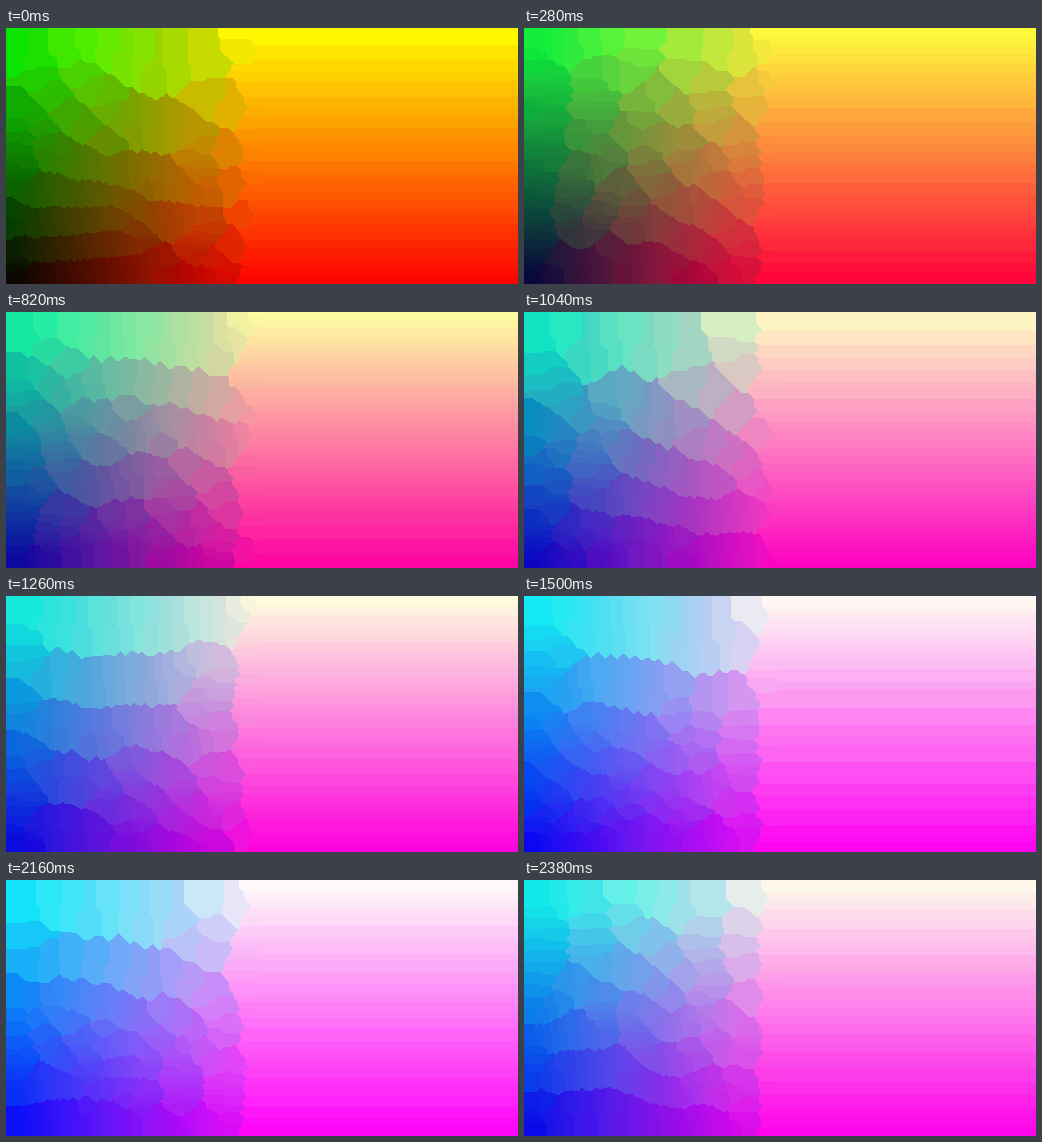
Animation, 512 px wide and 256 px high, one loop 2.4 s. Source, as an HTML page with a canvas:

```html
<!DOCTYPE html>
<html>
<head>
<meta charset="utf-8">
<style>
html, body { margin: 0; width: 100%; height: 100%; overflow: hidden; }
canvas { display: block; }
</style>
</head>
<body>
<canvas id="stage" width="512" height="256"></canvas>
<script>
const W = 512, H = 256, SIZE = 256, SAMPLING = 21;
const ctx = document.getElementById('stage').getContext('2d');
const redAt = x => Math.min(x, 255);
const greenAt = y => 255 - y;

// Self-organising 256-colour palette of the red/green/blue slice.
function learnPalette(blue) {
  const ramp = () => Float64Array.from({ length: SIZE }, (_, i) => i * 16);
  const R = ramp(), G = ramp(), B = ramp();
  const freq = new Int32Array(SIZE).fill(256), bias = new Int32Array(SIZE);
  const power = new Int32Array(32);
  const samples = W * H / SAMPLING, cycle = Math.floor(samples / 100);
  const alphaDecay = 30 + (SAMPLING - 1) / 3;
  let alpha = 1024, radius = 2048, reach;

  function updateReach() {
    reach = radius >> 6;
    if (reach <= 1) reach = 0;
    const sq = reach * reach;
    for (let i = 0; i < reach; i++) power[i] = alpha * ((sq - i * i) * 256 / sq);
  }

  function contest(r, g, b) {
    let best = 0, bestDist = Infinity, winner = 0, winnerDist = Infinity;
    for (let i = 0; i < SIZE; i++) {
      const dist = Math.abs(R[i] - r) + Math.abs(G[i] - g) + Math.abs(B[i] - b);
      if (dist < bestDist) { bestDist = dist; best = i; }
      const biased = dist - (bias[i] >> 12);
      if (biased < winnerDist) { winnerDist = biased; winner = i; }
      const share = freq[i] >> 10;
      freq[i] -= share;
      bias[i] += share << 10;
    }
    freq[best] += 64;
    bias[best] -= 65536;
    return winner;
  }

  function pull(i, amount, r, g, b) {
    R[i] -= amount * (R[i] - r);
    G[i] -= amount * (G[i] - g);
    B[i] -= amount * (B[i] - b);
  }

  updateReach();
  for (let n = 0, pixel = 0; n < samples; pixel = (pixel + 499) % (W * H)) {
    const r = redAt(pixel % W) * 16, g = greenAt(Math.floor(pixel / W)) * 16, b = blue * 16;
    const hit = contest(r, g, b);
    pull(hit, alpha / 1024, r, g, b);
    const lo = Math.abs(hit - reach), hi = Math.min(hit + reach, SIZE);
    if (reach) {
      for (let m = 1, j = hit + 1, k = hit - 1; j < hi || k > lo; m++) {
        const amount = power[m] / 262144;
        if (j < hi) pull(j++, amount, r, g, b);
        if (k > lo) pull(k--, amount, r, g, b);
      }
    }
    if (++n % cycle === 0) {
      alpha -= alpha / alphaDecay;
      radius -= radius / 30;
      updateReach();
    }
  }
  return Array.from(R, (r, i) => [r >> 4, G[i] >> 4, B[i] >> 4]).sort((p, q) => p[1] - q[1]);
}

// Nearest palette entry by Manhattan distance, walking outwards in green.
function nearest(palette, start, r, g, b) {
  let best = palette[0], bestDist = 1000;
  for (let up = start, down = start - 1; up < SIZE || down >= 0;) {
    if (up < SIZE) {
      const p = palette[up++];
      if (p[1] - g >= bestDist) up = SIZE;
      else check(p);
    }
    if (down >= 0) {
      const p = palette[down--];
      if (g - p[1] >= bestDist) down = -1;
      else check(p);
    }
  }
  function check(p) {
    const dist = Math.abs(p[0] - r) + Math.abs(p[1] - g) + Math.abs(p[2] - b);
    if (dist < bestDist) { bestDist = dist; best = p; }
  }
  return best;
}

function render(blue) {
  const palette = learnPalette(blue);
  const image = new ImageData(W, H);
  const pixels = new Uint32Array(image.data.buffer);
  for (let y = 0; y < H; y++) {
    const g = greenAt(y);
    const below = palette.filter(p => p[1] < g).length;
    const upTo = palette.filter(p => p[1] <= g).length;
    const start = (below + upTo) >> 1;
    for (let x = 0; x < 256; x++) {
      const [r, gg, b] = nearest(palette, start, redAt(x), g, blue);
      pixels[y * W + x] = (255 << 24 | b << 16 | gg << 8 | r) >>> 0;
    }
    pixels.fill(pixels[y * W + 255], y * W + 256, (y + 1) * W);
  }
  return image;
}

const cache = new Map();
let shown = -1;

function draw() {
  const step = Math.floor(performance.now() % 2400 / 20);
  const blue = Math.round(255 * Math.sin(step * 0.01667));
  if (blue !== shown) {
    if (!cache.has(blue)) cache.set(blue, render(blue));
    ctx.putImageData(cache.get(blue), 0, 0);
    shown = blue;
  }
  requestAnimationFrame(draw);
}
draw();
</script>
</body>
</html>
```
